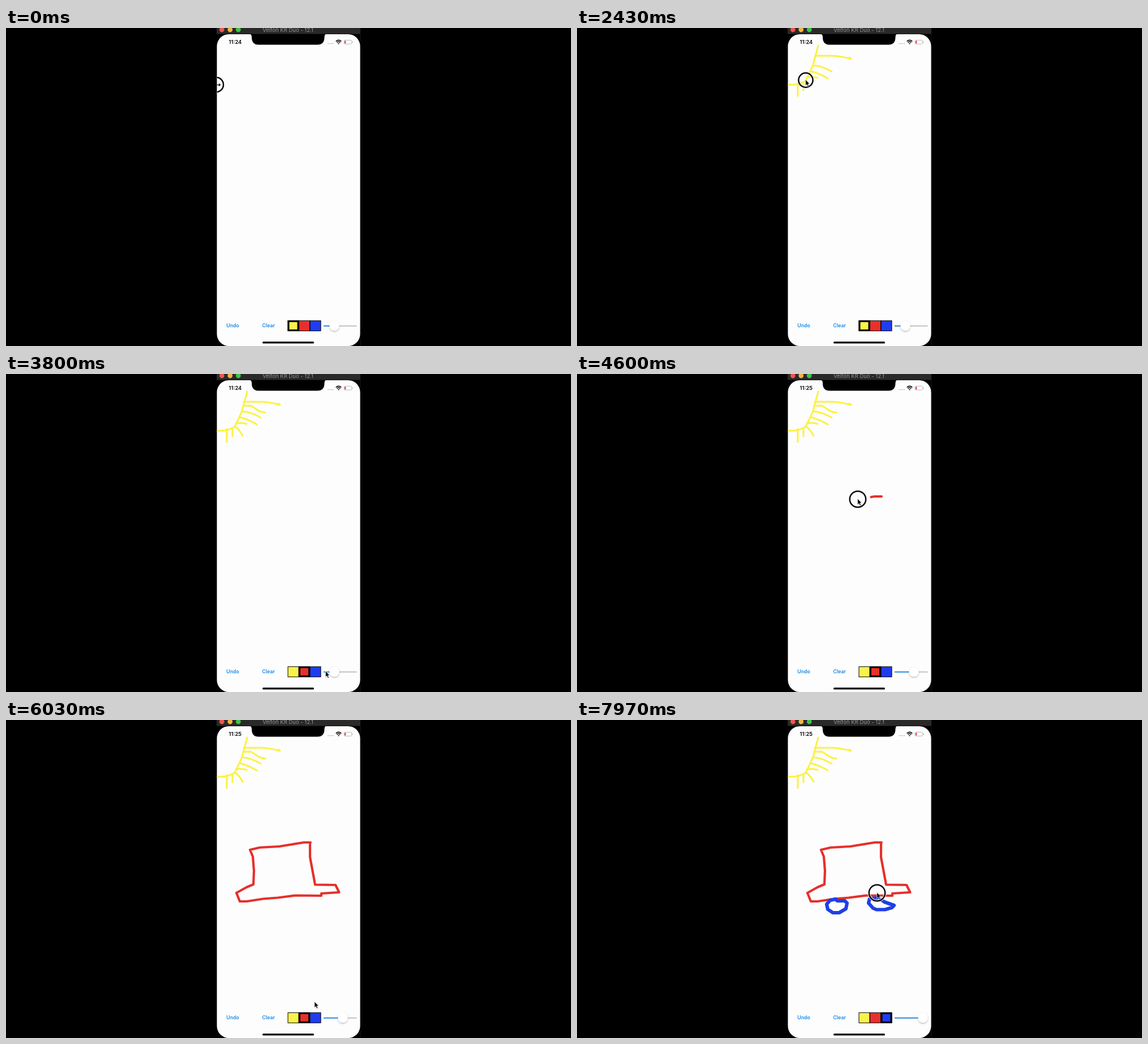
These frames come from a looping animation (998 px wide and 561 px high, 8000 ms). An HTML page:

```html
<!DOCTYPE html>
<html lang="en">
<head>
<meta charset="utf-8">
<title>Drawing app</title>
<style>
  html, body { margin: 0; width: 100%; height: 100%; overflow: hidden; background: #000; }
  svg { display: block; width: 998px; height: 561px; }
  text { font-family: Inter, "Liberation Sans", sans-serif; }
  .button { font-size: 8.7px; font-weight: 600; fill: #168aea; }
  .swatch { stroke: #000; }
  #ink path { fill: none; stroke-linecap: round; stroke-linejoin: round; }
</style>
</head>
<body>
<svg viewBox="0 0 998 561">
  <defs>
    <clipPath id="screen"><rect x="372.5" y="11" width="253" height="550" rx="21"/></clipPath>
    <filter id="shadow" x="-50%" y="-50%" width="200%" height="200%">
      <feDropShadow dx="0" dy="1.5" stdDeviation="1.5" flood-opacity=".28"/>
    </filter>
  </defs>
  <rect width="998" height="561"/>

  <rect x="372" width="254" height="10.5" fill="#2b2928"/>
  <circle cx="381.3" cy="3" r="4.4" fill="#f4544d"/>
  <circle cx="395.8" cy="3" r="4.4" fill="#f6b33d"/>
  <circle cx="410.3" cy="3" r="4.4" fill="#38c649"/>
  <text x="498" y="6.7" text-anchor="middle" font-size="9.5" fill="#969493">Velfon KR Duo - 12.1</text>
  <path d="M626 11V561" stroke="#252525" stroke-width=".7"/>

  <g clip-path="url(#screen)">
    <rect x="372" y="11" width="254" height="550" fill="#fdfdfd"/>
    <path d="M430 10.5Q434 11 434 16Q434 29.5 446 29.5H550Q562.5 29.5 562.5 16Q562.5 11 566 10.5Z"/>
    <text id="clock" x="393.5" y="28.3" font-size="9.4" font-weight="600"></text>
    <path d="M568.5 27.5H579" stroke="#aaa" stroke-width="1.4" stroke-dasharray="1.6 1.4"/>
    <g fill="none" stroke="#111" stroke-width="1.6">
      <path d="M582.7 23.6Q587.5 19.2 592.3 23.6M584.4 25.6Q587.5 22.8 590.6 25.6"/>
      <path d="M586.2 27.2H588.8L587.5 28.3Z" stroke-width="1"/>
    </g>
    <rect x="597" y="21.5" width="13.6" height="6.8" rx="2" fill="none" stroke="#aaa" stroke-width=".8"/>
    <rect x="598" y="22.4" width="2.2" height="5" rx=".8" fill="#f23a3f"/>
    <path d="M612 23.6V26.2" stroke="#aaa"/>

    <g id="ink"></g>

    <text class="button" x="389.3" y="528.4">Undo</text>
    <text class="button" x="452.5" y="528.4">Clear</text>
    <rect class="swatch" x="498" y="516.3" width="19" height="18" fill="#f9f24b"/>
    <rect class="swatch" x="517.5" y="516.3" width="19" height="18" fill="#e92f2b"/>
    <rect class="swatch" x="537" y="516.3" width="19" height="18" fill="#1f3df0"/>
    <rect id="selection" y="517.3" width="17" height="16" fill="none" stroke="#000" stroke-width="3"/>
    <path d="M561 525.6H619.5" stroke="#b9b9bb" stroke-width="1.8"/>
    <path id="level" stroke="#168aea" stroke-width="1.8"/>
    <circle id="thumb" cy="525.3" r="8.6" fill="#fff" filter="url(#shadow)"/>
    <rect x="453" y="553.3" width="91" height="3.2" rx="1.6"/>

    <g id="ring" fill="none">
      <circle stroke="#fff" stroke-opacity=".75" stroke-width="5"/>
      <circle stroke="#080808" stroke-width="2.5"/>
    </g>
    <path id="resize" d="M372 100.3H378M375.8 98L378.5 100.3L375.8 102.6" fill="none" stroke="#111" stroke-width="1.3"/>
    <path id="arrow" d="M0 0V10.8L2.4 8.5L4.1 12.4L6 11.5L4.3 7.8H7.5Z" fill="#050505" stroke="#fff" stroke-width=".7"/>
  </g>
</svg>

<script>
const LOOP = 8000;
const INK_LAG = 57;      // ink trails the finger
const TOUCH_LEAD = 80;   // finger rests before it moves
const YELLOW = { stroke: "#fbf243", "stroke-width": 3 };
const RED = { stroke: "#e5302b", "stroke-width": 4.2 };
const BLUE = { stroke: "#1f3fe8", "stroke-width": 6.2 };

// Each touch: start, end, path, and the pen when it leaves ink.
const touches = [
  [30, 580, "M371 100H384Q392 99 403 94Q407 88 417 65L426 31", YELLOW],
  [700, 820, "M400 95V110", YELLOW],
  [940, 1060, "M406 87Q416 85 425 88", YELLOW],
  [1160, 1310, "M417 66Q431 66 450 77", YELLOW],
  [1490, 1640, "M413 76Q430 81 443 89", YELLOW],
  [1790, 2010, "M420 49H448Q465 49 484 54.5L481 52", YELLOW],
  [2170, 2290, "M390 97V120", YELLOW],
  [2470, 2620, "M404 92Q413 99 418 109", YELLOW],
  [2810, 3030, "M419 56H433L442 62Q448 67 458 68", YELLOW],
  [3520, 3600, "M527 525h1"],
  [3920, 4150, "M580 525H595"],
  [4500, 5752, "M538 216H526L483 223L448 225L431 229L436 241L438 266L437 290L425 295L407 305" +
    "L413 320H425L454 315.5L480 313.5L511 309.5L557 310V306L588.5 304L582 291L546 290.5L537 242V216", RED],
  [6120, 6200, "M546 525h1"],
  [6380, 6600, "M595 525H611"],
  [6940, 7330, "M457 316L447 318L441 325L443 334L452 340H463L475 333L477 323L473 319H460L456 316", BLUE],
  [7500, 7970, "M530 314L517 315L515 323L523 332L529 334.5H544L556 331L560 327L543 321L534 315L530 305", BLUE],
].map(([start, end, d, pen]) => {
  const path = document.createElementNS("http://www.w3.org/2000/svg", "path");
  path.setAttribute("d", d);
  for (const [key, value] of Object.entries(pen || { stroke: "none" })) path.setAttribute(key, value);
  document.getElementById("ink").append(path);
  return { start, end, path, length: path.getTotalLength() };
});

const el = id => document.getElementById(id);
const clamp = x => Math.min(1, Math.max(0, x));
const smooth = x => x * x * (3 - 2 * x);
const mix = (a, b, p) => a + (b - a) * p;
const progress = (t, a, b) => clamp((t - a) / (b - a));
const pointOn = (touch, t) =>
  touch.path.getPointAtLength(touch.length * progress(t, touch.start, touch.end));

function pointerAt(t) {
  const next = touches.findIndex(touch => t < touch.start);
  if (next === 0) return pointOn(touches[0], t);
  const last = touches.at(next < 0 ? -1 : next - 1);
  const from = pointOn(last, t);
  if (next < 0 || t < last.end) return from;
  const to = pointOn(touches[next], t);
  const p = smooth(progress(t, last.end + 60, touches[next].start - TOUCH_LEAD / 2));
  return { x: mix(from.x, to.x, p), y: mix(from.y, to.y, p) };
}

function render(t) {
  for (const { start, end, path, length } of touches) {
    const p = progress(t - INK_LAG, start, end);
    path.style.display = p > 0 ? "" : "none";
    path.style.strokeDasharray = p < 1 ? `${length * p} ${length * 2}` : "none";
  }

  const { x, y } = pointerAt(t);
  const active = touches.find(({ start, end }) => t >= start - TOUCH_LEAD && t <= end + 20);
  el("ring").style.display = active ? "" : "none";
  if (active) {
    const radius = mix(11, 14.2, progress(t, active.start - TOUCH_LEAD, active.start));
    el("ring").setAttribute("transform", `translate(${x} ${y})`);
    for (const circle of el("ring").children) circle.setAttribute("r", radius);
  }
  const atEdge = x < 376;
  el("resize").style.display = atEdge ? "" : "none";
  el("arrow").style.display = atEdge ? "none" : "";
  el("arrow").setAttribute("transform", `translate(${x - .3} ${y - 1})`);

  const selected = (t >= 3560) + (t >= 6160);
  el("selection").setAttribute("x", 499 + 19.5 * selected);
  const thumb = 580 + 15 * progress(t, 3920, 4150) + 16 * progress(t, 6380, 6600);
  el("thumb").setAttribute("cx", thumb);
  el("level").setAttribute("d", `M561 525.6H${thumb}`);
  el("clock").textContent = t < 4600 ? "11:24" : "11:25";
}

const origin = performance.now();
function frame() {
  render((performance.now() - origin) % LOOP);
  requestAnimationFrame(frame);
}
frame();
</script>
</body>
</html>
```
